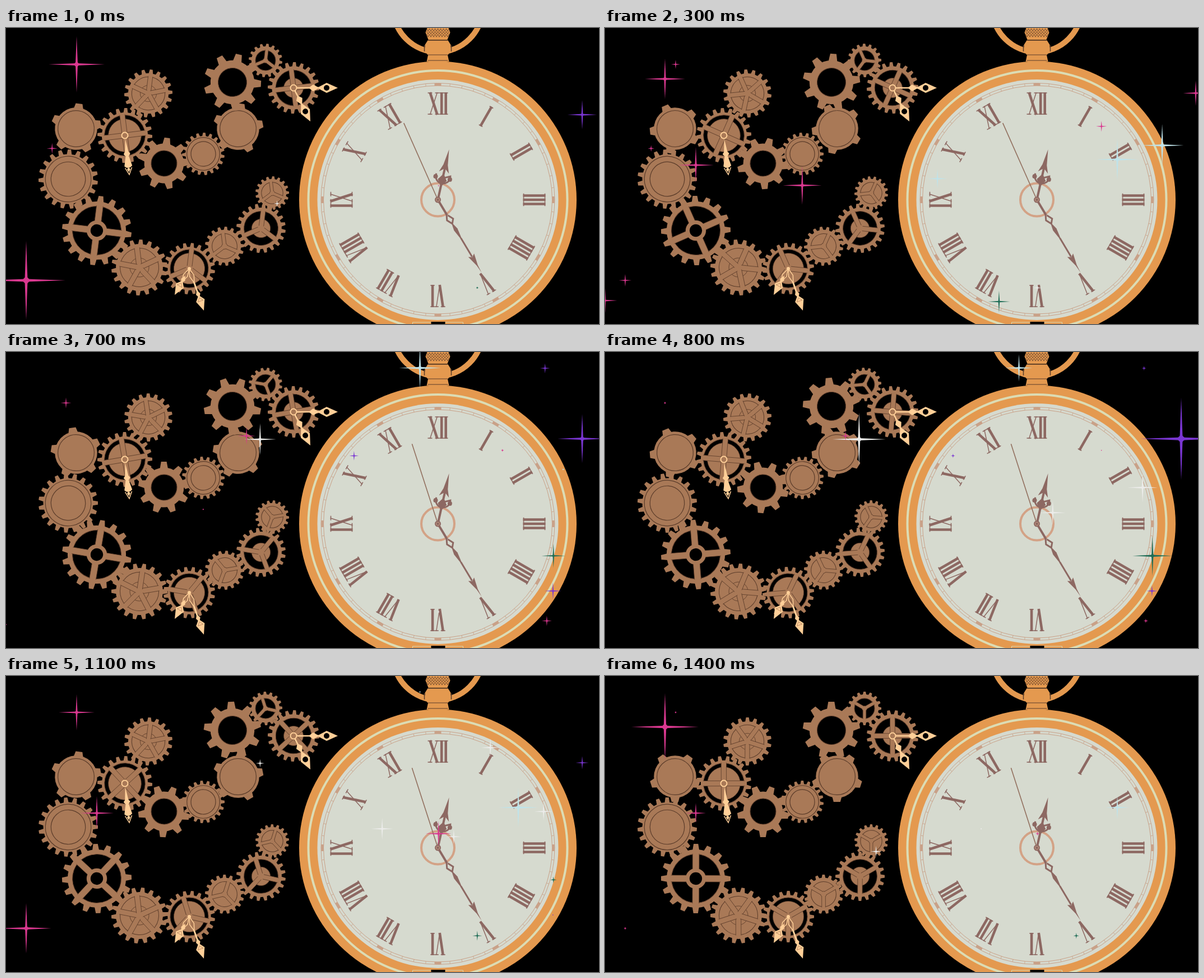
Animation, 1058 px wide and 529 px high, one loop 1500 ms. Source, as an HTML page with a canvas:

```html
<!DOCTYPE html>
<html lang="en">
<head>
<meta charset="utf-8">
<title>Clockwork</title>
<style>
html, body { margin: 0; height: 100%; overflow: hidden; background: #000; }
canvas { display: block; }
</style>
</head>
<body>
<canvas id="stage" width="1058" height="529"></canvas>
<script>
const ctx = document.getElementById('stage').getContext('2d');
const TAU = Math.PI * 2, DEG = Math.PI / 180, STEPS = 15;
const BROWN = '#a97957', LINE = '#5b3c2a', PEACH = '#ffcf98';
const GOLD = '#e4994f', CREAM = '#dcdcb4', FACE = '#d6dacf', INK = '#8d6862', TRACK = '#c9a188';
const PINK = '#d9388f', WHITE = '#ececea', VIOLET = '#7a36d2', GREEN = '#1f6d56', ICE = '#bfe3ea';

// Proportions relative to the tip radius
const kinds = {
  cap: { teeth: 5, rings: [.72] },
  dial: { teeth: 19, rings: [.77, .58] },
  cog: { teeth: 9, body: .77, well: .5 },
  star: { teeth: 18, well: .69, hub: .34, spokes: 5, solid: true },
  fan: { teeth: 17, well: .64, hub: .15, spokes: 3, solid: true },
  trio: { teeth: 16, well: .6, hub: .15, spokes: 3 },
  drum: { teeth: 20, well: .74, hub: .6, spokes: 4 },
  wheel: { teeth: 20, well: .69, hub: .38, spokes: 4 },
  rim: { teeth: 16, well: .7, hub: .29, spokes: 4, bore: .18 }
};

// A meshed chain, so neighbours turn in opposite directions
const gears = [
  [475, 295, 30, 'fan'], [455, 358, 44, 'wheel', 3], [390, 390, 35, 'fan'], [327, 430, 46, 'drum', 3],
  [238, 428, 50, 'star'], [162, 362, 62, 'rim'], [111, 270, 53, 'dial'], [125, 180, 45, 'cap'],
  [212, 192, 49, 'drum'], [282, 242, 46, 'cog'], [352, 225, 38, 'dial'], [414, 180, 45, 'cap'],
  [404, 97, 51, 'cog'], [463, 58, 30, 'trio'], [513, 107, 46, 'wheel'], [254, 117, 43, 'star']
];

function at(x, y, angle, draw) {
  ctx.save();
  ctx.translate(x, y);
  ctx.rotate(angle);
  draw();
  ctx.restore();
}

// Draws the same thing n times around the current centre
function around(n, draw) {
  for (let i = 0; i < n; i++) at(0, 0, i * TAU / n, () => draw(i));
}

function disc(r, fill, x = 0, y = 0) {
  ctx.beginPath();
  ctx.arc(x, y, r, 0, TAU);
  ctx.fillStyle = fill;
  ctx.fill();
}

function ring(r, color, width = 1, x = 0, y = 0) {
  ctx.beginPath();
  ctx.arc(x, y, r, 0, TAU);
  ctx.strokeStyle = color;
  ctx.lineWidth = width;
  ctx.stroke();
}

function poly(fill, ...pts) {
  ctx.beginPath();
  pts.forEach(p => ctx.lineTo(...p));
  ctx.closePath();
  ctx.fillStyle = fill;
  ctx.fill();
}

function stroke(color, width, ...pts) {
  ctx.beginPath();
  pts.forEach(p => ctx.lineTo(...p));
  ctx.strokeStyle = color;
  ctx.lineWidth = width;
  ctx.stroke();
}

// Shapes on the downward axis
const kite = (fill, y0, mid, y1, half) => poly(fill, [0, y0], [half, mid], [0, y1], [-half, mid]);
const rod = (color, width, y0, y1) => stroke(color, width, [0, y0], [0, y1]);

function drawGear([x, y, r, kind, spokeCount], index, turn) {
  const { teeth, rings = [], body = .84, well, hub, spokes, solid, bore } = kinds[kind];
  const dir = index % 2 ? -1 : 1, root = body * r;
  const half = Math.min(Math.PI * root / teeth, 15) / 2;
  at(x, y, dir * turn, () => {
    // Every other gear sits half a tooth off to mesh with its neighbours
    at(0, 0, dir > 0 ? Math.PI / teeth : 0, () => around(teeth, () =>
      poly(BROWN, [-half - 1, 2 - root], [-half * .8, -r], [half * .8, -r], [half + 1, 2 - root])));
    disc(root, BROWN);
    rings.forEach(k => ring(k * r, LINE, 1.2));
    if (!well) return;
    disc(well * r, solid ? BROWN : '#000');
    ring(well * r, LINE);
    if (!hub) return;
    disc(hub * r, BROWN);
    ring(hub * r, LINE, .8);
    around(spokeCount || spokes, () => {
      const w = .095 * r, end = -well * r - 1;
      poly(BROWN, [-w, 0], [-w, end], [w, end], [w, 0]);
      for (const side of [-w, w]) stroke(LINE, .8, [side, -w], [side, end]);
    });
    if (bore) {
      disc(hub * r, BROWN);
      disc(bore * r, '#000');
    }
  });
}

// Draws along the line from (x, y) towards (x + dx, y + dy), passing its length
function pointer(x, y, dx, dy, draw) {
  at(x, y, Math.atan2(-dx, dy), () => draw(Math.hypot(dx, dy)));
}

function drawGearHands() {
  pointer(212, 192, 8, 70, len => {
    ring(5.5, PEACH, 2);
    kite(PEACH, 6, 29, 40, 3);
    kite(PEACH, 26, 33, 41, 6);
    poly(PEACH, [-3, 38], [3, 38], [7, 55], [3, 58], [-3, 58], [-7, 55]);
    stroke(PEACH, 1.5, [-6, 58], [0, len], [6, 58]);
    kite(PEACH, 57, 61, 66, 3);
  });
  ring(5.5, PEACH, 2, 513, 107);
  for (const [dx, dy] of [[79, 0], [30, 60]])
    pointer(513, 107, dx, dy, len => {
      rod(PEACH, 2.5, 6, len - 30);
      kite(PEACH, len - 52, len - 44, len - 33, 6);
      kite(PEACH, len - 37, len - 20, len, 9);
      disc(5, '#000', 0, len - 20);
    });
  for (const [dx, dy] of [[-26, 47], [26, 75]])
    pointer(327, 430, dx, dy, len => {
      stroke(PEACH, 1.5, [0, 0], [-4, 14], [0, 27], [4, 14], [0, 0]);
      rod(PEACH, 3, 26, len - 25);
      kite(PEACH, len - 39, len - 31, len - 24, 4);
      kite(PEACH, len - 29, len - 19, len, 8);
      stroke(BROWN, .7, [-5, len - 18], [0, len - 24], [5, len - 18], [-5, len - 18]);
    });
  disc(3, PEACH, 327, 430);
}

// Condensed engraved numerals: thick and thin strokes with serifs, 40 units tall
const advance = { I: 7.5, V: 19, X: 21 };
const bar = (x0, x1, width) => stroke(INK, width, [x0, -20], [x1, 20]);
const serif = (x0, x1, y) => stroke(INK, 1.6, [x0, y], [x1, y]);
const glyphs = {
  I() {
    bar(3.7, 3.7, 4.6);
    for (const y of [-19, 19]) serif(0, 7.5, y);
  },
  V() {
    bar(4, 10, 4.6);
    bar(16, 10, 1.5);
    serif(0, 8, -19);
    serif(12, 19, -19);
  },
  X() {
    bar(4, 17, 4.6);
    bar(17, 4, 1.5);
    for (const y of [-19, 19]) {
      serif(0, 8, y);
      serif(13, 21, y);
    }
  }
};

function drawNumeral(text) {
  const width = [...text].reduce((sum, c) => sum + advance[c], 0);
  ctx.translate(-width / 2, -172);
  for (const c of text) {
    glyphs[c]();
    ctx.translate(advance[c], 0);
  }
}

function drawCrown() {
  ring(80, GOLD, 10, 0, -344);
  at(0, -307, 0, () => {
    poly(GOLD, [-17, 46], [17, 46], [20, 60], [-20, 60]);
    poly(GOLD, [-18, 22], [18, 22], [23, 30], [23, 42], [18, 48], [-18, 48], [-23, 42], [-23, 30]);
    poly(GOLD, [-19, 0], [19, 0], [22, 8], [17, 21], [-17, 21], [-22, 8]);
    for (const y of [22, 48, 58]) stroke(LINE, 1, [-18, y], [18, y]);
    for (const x of [-24, 24]) stroke(LINE, 1.5, [x, 31], [x, 42]);
    for (let y = 1; y < 13; y += 5)
      for (let x = -20; x < 18; x += 5)
        stroke(LINE, .8, [x, y], [x + 2.5, y + 5], [x + 5, y]);
  });
}

function drawDial() {
  disc(247.5, GOLD);
  ring(231, CREAM, 4);
  disc(215, FACE);
  for (const r of [208.5, 204]) ring(r, TRACK);
  around(60, i => i % 5
    ? stroke(TRACK, .8, [0, -208], [0, -204])
    : stroke(TRACK, 4.5, [-6, -206], [6, -206]));
  const numerals = 'XII I II III IIII V VI VII VIII IX X XI'.split(' ');
  around(12, i => drawNumeral(numerals[i]));
  ring(29.5, '#d3a286', 4);
  stroke(CREAM, 1, [-45, 222], [-45, 219], [45, 219], [45, 222]);
  ctx.fillStyle = '#000';
  ctx.fillRect(-12, 218, 25, 4);
}

function drawClockHands(ticks) {
  pointer(0, 0, 20, -90, len => {
    rod(INK, 4, 0, 60);
    ctx.beginPath();
    ctx.arc(0, 43, 13, .2, Math.PI - .2, true);
    ctx.arc(0, 25, 13, 1, Math.PI - 1);
    ctx.lineWidth = 3;
    ctx.stroke();
    for (const x of [-13, 13]) disc(4, INK, x, 40);
    kite(INK, 24, 36, 48, 8);
    poly(INK, [-2, 56], [-9, 50], [-4, 64], [0, len], [4, 64], [9, 50], [2, 56]);
  });
  pointer(0, 0, 78, 130, len => {
    rod(INK, 4, 0, 32);
    stroke(INK, 3, [0, 30], [-5, 40], [0, 50], [6, 43], [1, 33]);
    kite(INK, 46, 62, 88, 3.5);
    rod(INK, 3, 80, len - 33);
    poly(INK, [-6, len - 36], [0, len - 32], [6, len - 36], [1, len - 15], [0, len], [-1, len - 15]);
  });
  at(0, 0, (ticks * 6 - 23.9) * DEG, () => rod('#92705f', 1.6, 0, -150));
  disc(5.5, INK);
  ring(3, TRACK);
}

function drawClock(ticks) {
  at(770.5, 307, 0, () => {
    drawCrown();
    drawDial();
    drawClockHands(ticks);
  });
}

let seed = 7;
const random = () => (seed = seed * 16807 % 2147483647) / 2147483647;
const palette = [PINK, PINK, WHITE, WHITE, ICE, VIOLET, GREEN];

// The brightest sparkles return; small ones are scattered over the loop
const sparkles = [
  [PINK, 126, 65, 50, 0], [PINK, 36, 451, 70, 0], [VIOLET, 1028, 155, 73, 8],
  [PINK, 107, 91, 60, 4], [PINK, 162, 245, 50, 2], [ICE, 914, 235, 58, 2]
].map(([color, x, y, arm, birth]) => ({ color, x, y, arm, birth, period: 10 }));
for (let i = 0; i < 24; i++)
  sparkles.push({
    color: palette[i % palette.length],
    x: random() * 1058,
    y: random() * 529,
    arm: 10 + 40 * random(),
    birth: Math.floor(random() * STEPS),
    period: STEPS
  });

// One step of growth, then a quadratic fade over five steps
function drawSparkle({ color, x, y, arm, birth, period }, step) {
  const age = (step - birth + 1 + period) % period - 1;
  if (age >= 5) return;
  const size = arm * (age < 0 ? .6 : (1 - age / 5) ** 2);
  const w = .8 + size * .025, core = size * .1 + .5;
  at(x, y, 0, () => {
    kite(color, -size, 0, size, w);
    kite(color, -w, 0, w, size);
    kite(color, -core, 0, core, core);
  });
}

function render() {
  const step = Math.floor(performance.now() / 100) % STEPS;
  const ticked = step >= 7;
  // The wheels run faster once the second hand has moved
  const turn = (ticked ? 14.2 * step - 19 : 10.3 * step - 7) * DEG;
  ctx.fillStyle = '#000';
  ctx.fillRect(0, 0, 1058, 529);
  gears.forEach((gear, i) => drawGear(gear, i, turn));
  drawGearHands();
  drawClock(ticked ? 1 : 0);
  sparkles.forEach(s => drawSparkle(s, step));
  requestAnimationFrame(render);
}
render();
</script>
</body>
</html>
```
